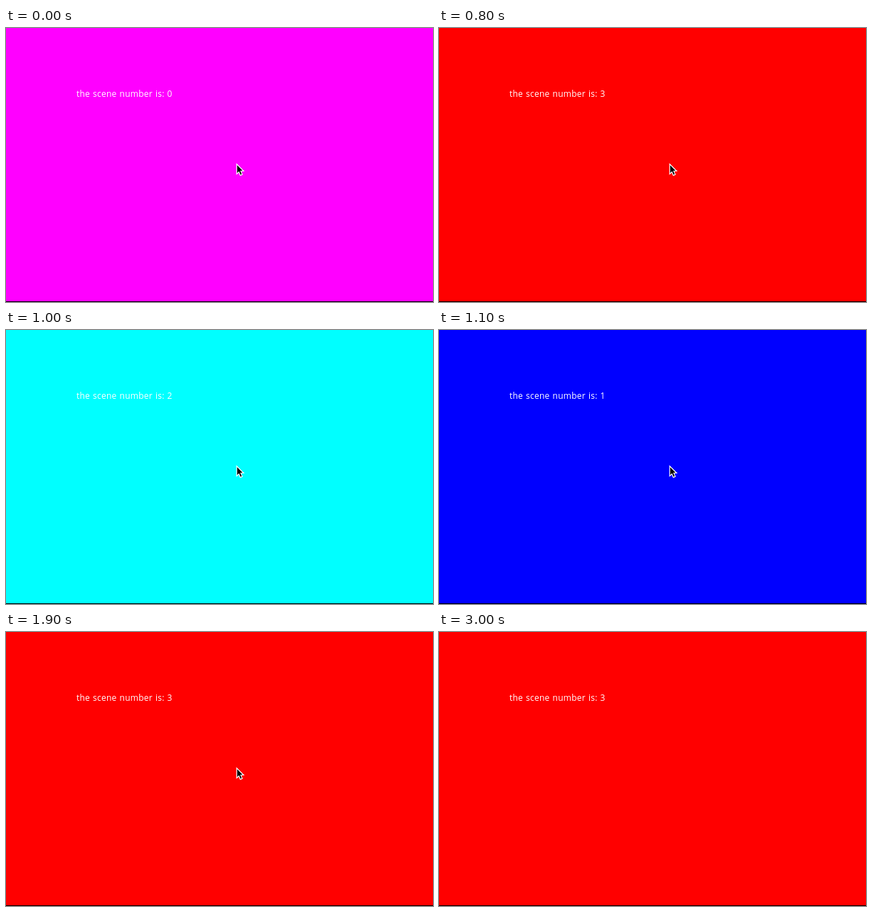
Write an HTML page that moves like this. It is 600 px wide and 386 px high and loops after 3.1 s.

```html
<!DOCTYPE html>
<html lang="en">
<head>
<meta charset="utf-8">
<title>Scene number</title>
<style>
  html, body { margin: 0; width: 100%; height: 100%; overflow: hidden; }

  .stage {
    position: relative;
    width: 600px;
    height: 386px;
    overflow: hidden;
    animation: scene 3100ms step-end infinite;
  }
  .stage::after {
    content: "";
    position: absolute;
    left: 0;
    bottom: 0;
    width: 100%;
    height: 1px;
    background: #000;
  }

  .label {
    position: absolute;
    left: 99px;
    top: 84px;
    font: 12px/17px "Open Sans", "Noto Sans", sans-serif;
    letter-spacing: .25px;
    word-spacing: .6px;
    white-space: pre;
    color: #fff;
  }
  .label::after {
    content: "0";
    animation: number 3100ms step-end infinite;
  }

  .cursor {
    position: absolute;
    left: 323px;
    top: 190px;
    overflow: visible;
    animation: leave 3100ms step-end infinite;
  }

  /* The scene counts down and wraps from 0 to 3. */
  @keyframes scene {
    0%, 19.35%, 38.7% { background-color: #f0f; }
    3.22%, 25.8%, 61.28%, 100% { background-color: #f00; }
    9.67%, 29.03% { background-color: #0ff; }
    16.12%, 35.48% { background-color: #00f; }
  }
  @keyframes number {
    0%, 19.35%, 38.7% { content: "0"; }
    3.22%, 25.8%, 61.28%, 100% { content: "3"; }
    9.67%, 29.03% { content: "2"; }
    16.12%, 35.48% { content: "1"; }
  }
  /* The pointer speeds up towards the upper right and leaves the stage. */
  @keyframes leave {
    0%, 61.28% { transform: translate(0, 0); }
    64.51% { transform: translate(12px, -12px); }
    67.73% { transform: translate(55px, -53px); }
    70.96% { transform: translate(105px, -110px); }
    74.18% { transform: translate(150px, -165px); }
    77.41%, 100% { transform: translate(190px, -215px); }
  }
</style>
</head>
<body>
<div class="stage">
  <div class="label">the scene number is: </div>
  <svg class="cursor" width="12" height="19" viewBox="0 0 12 19">
    <path d="M1.8 3.2V14.2L4.4 11.8L6.6 16.8L8.2 16.1L6.1 10.9H9.4Z"
      fill="#000" stroke="#fff" stroke-width="2.4" paint-order="stroke"/>
  </svg>
</div>
</body>
</html>
```
